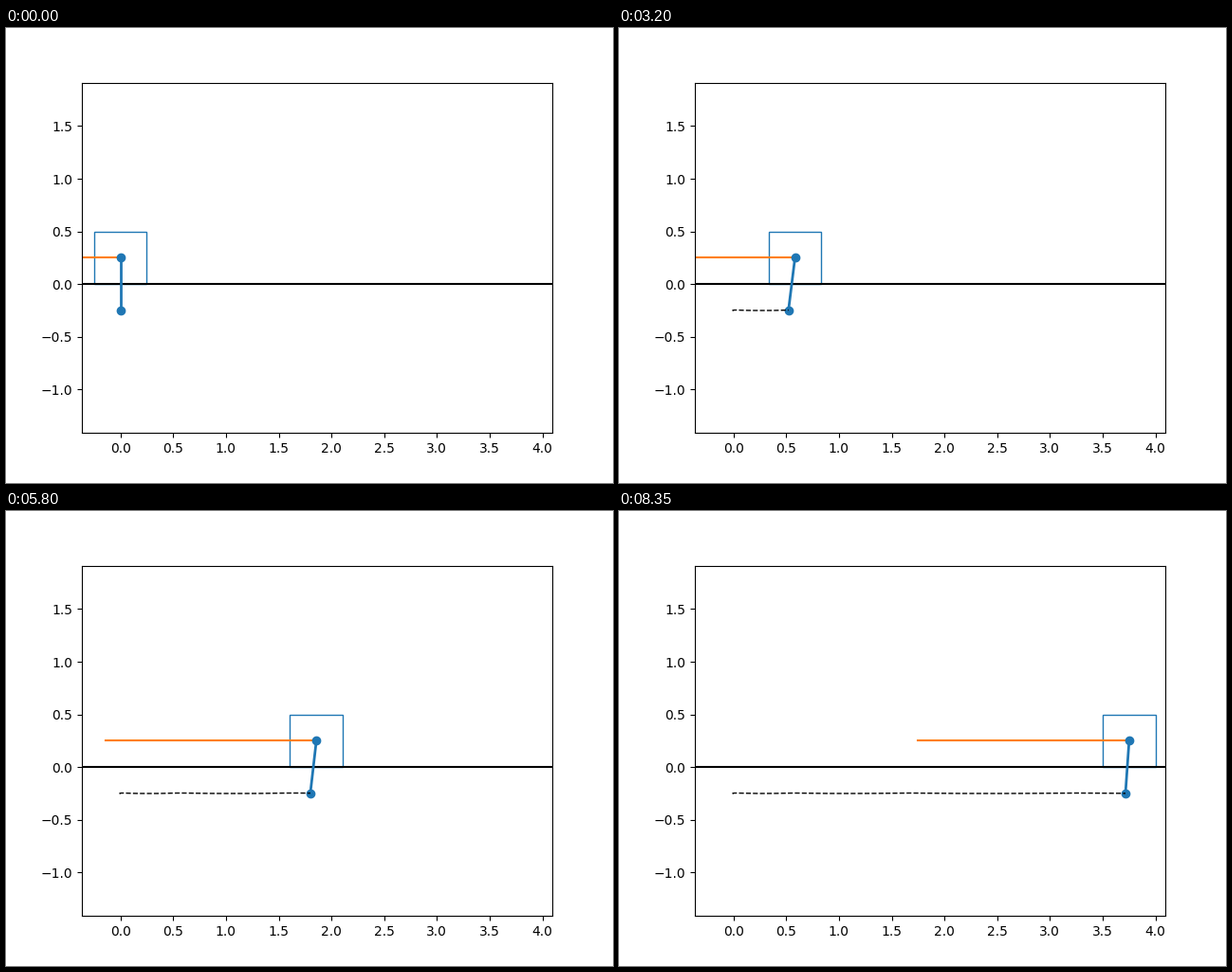
A matplotlib script that plays this animation: 640x480 px, repeating every 9.6 s.

```python
import numpy as np
import matplotlib.pyplot as plt
from matplotlib.animation import FuncAnimation
from matplotlib.patches import Rectangle

STEP = 0.05            # seconds per frame
FRAMES = 192
T_STOP = 8.314         # the cart reaches the end of its track here
SIDE = 0.5             # cart side
ROD = 0.5              # pendulum length
PIVOT_Y = SIDE / 2
FORCE = 2.0            # length of the force line

ACCEL = 0.1125         # mean cart acceleration
DRAG = 0.0135          # linear friction of the cart
SWAY = 0.016           # push of the pendulum back on the cart
SWING = 0.128          # largest pendulum angle
PERIOD = 2.225


def state(t):
    """Cart position and pendulum angle at time t."""
    phase = (1 - np.cos(2 * np.pi * t / PERIOD)) / 2
    x = ACCEL * t**2 / 2 * (1 - DRAG * t / 3) + SWAY * phase
    return x, SWING * phase


times = np.minimum(np.arange(FRAMES) * STEP, T_STOP)
cart_x, angle = state(times)
bob_x = cart_x - ROD * np.sin(angle)
bob_y = PIVOT_Y - ROD * np.cos(angle)

fig, ax = plt.subplots(figsize=(6.4, 4.8), dpi=100)
ax.set_position([0.125, 0.11, 0.775, 0.77])
ax.set_xlim(-0.366, 4.0944)
ax.set_ylim(PIVOT_Y - 1.6619, PIVOT_Y + 1.6619)

ax.axhline(0, color="black", lw=1.5)
cart = ax.add_patch(Rectangle((0, 0), SIDE, SIDE, fill=False, ec="C0", lw=1))
force, = ax.plot([], [], color="C1", lw=1.5)
rod, = ax.plot([], [], "o-", color="C0", lw=2)
trail, = ax.plot([], [], "--", color="black", lw=1)


def draw(i):
    x = cart_x[i]
    cart.set_x(x - SIDE / 2)
    force.set_data([x - FORCE, x], [PIVOT_Y, PIVOT_Y])
    rod.set_data([x, bob_x[i]], [PIVOT_Y, bob_y[i]])
    trail.set_data(bob_x[:i + 1], bob_y[:i + 1])
    return cart, force, rod, trail


anim = FuncAnimation(fig, draw, frames=FRAMES, init_func=lambda: draw(0),
                     interval=STEP * 1000, repeat=True, repeat_delay=0)
plt.show()
```
